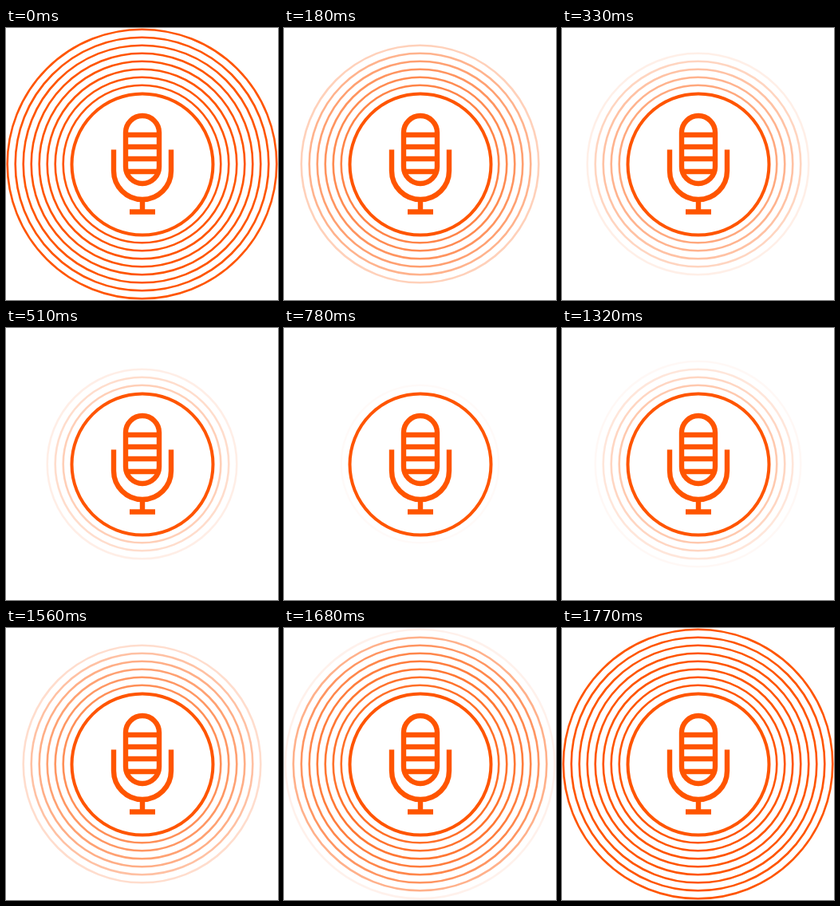
Animation, 341 px wide and 341 px high, one loop 1800 ms. Source, as an HTML page:

```html
<!DOCTYPE html>
<html lang="en">
<head>
<meta charset="utf-8">
<title>Microphone pulse</title>
<style>
  html, body { margin: 0; width: 100%; height: 100%; overflow: hidden; background: #fff; }
  svg { display: block; width: 100vw; height: 100vh; }
</style>
</head>
<body>
<svg viewBox="0 0 341 341" fill="none" stroke="#ff5500">
  <g id="rings" stroke-width="2.6"></g>
  <circle cx="171" cy="171" r="88.5" stroke-width="4"/>
  <g stroke-width="6.4">
    <rect x="150" y="110" width="42" height="85" rx="21"/>
    <path d="M150 134h42M150 149h42M150 164h42M150 180h42"/>
    <path d="M135 152.500V179A36 36 0 0 0 207 179V152.500"/>
    <path d="M171 215V229M155 230.500H187"/>
  </g>
</svg>
<script>
const LOOP = 1800, STEP = 30, COUNT = 8;
const group = document.getElementById('rings');
const clamp = v => Math.min(1, Math.max(0, v));

const rings = Array.from({ length: COUNT }, (_, i) => {
  const ring = document.createElementNS('http://www.w3.org/2000/svg', 'circle');
  ring.setAttribute('cx', 170.5);
  ring.setAttribute('cy', 170.5);
  ring.setAttribute('r', 98.8 + 10 * i);
  return group.appendChild(ring);
});

// Outer rings vanish first and return last.
function opacity(i, t) {
  const gone = 840 - 110 * i;
  const back = 985 + 97 * i;
  const level = t < 900 ? 1 - t / gone : (t - back) / (1770 - back);
  return clamp(level) ** 1.35;
}

function draw(now) {
  const t = Math.floor((now % LOOP) / STEP) * STEP;
  rings.forEach((ring, i) => ring.setAttribute('opacity', opacity(i, t)));
}

const start = performance.now();
function tick() {
  draw(performance.now() - start);
  requestAnimationFrame(tick);
}
tick();
</script>
</body>
</html>
```
